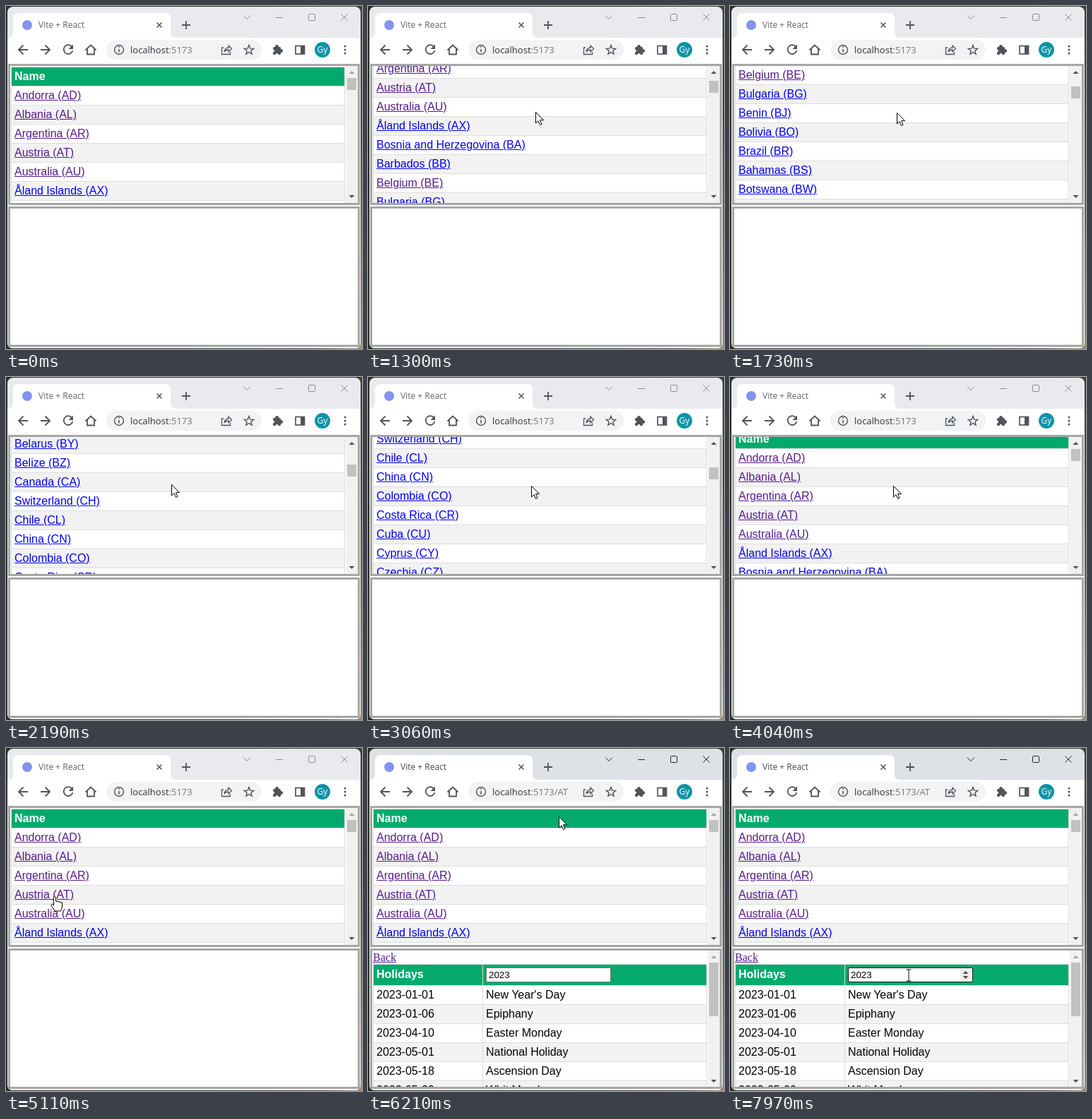
An HTML page for the animation above (8000 ms loop, 504 px wide and 486 px high).

```html
<!DOCTYPE html>
<html lang="en">
<head>
<meta charset="utf-8">
<title>Country holidays</title>
<style>
  html, body { margin: 0; width: 504px; height: 486px; overflow: hidden; }
  body { position: relative; background: linear-gradient(100deg, #2a3028 60%, #45433b 90%, #a08c78); }
  svg { position: absolute; left: 0; top: 0; overflow: visible; }
  .ui { font: 12px "Open Sans", "Noto Sans", sans-serif; }
  .panel { position: absolute; left: 3px; width: 492px; height: 194px; border: 3px solid #a6a6a6; background: #fff; overflow: hidden; }
  #top { top: 82px; }
  #bottom { top: 284px; height: 193px; }
  .page { position: absolute; left: 1px; top: 1px; width: 473px; font: 16px/18px "Liberation Sans", Arial, sans-serif; color: #000; }
  .row { box-sizing: border-box; position: relative; height: 27px; padding: 4px; border: 1px solid #ddd; border-bottom: 0; white-space: nowrap; background: #fff; }
  .row.odd { background: #f2f2f2; }
  .row.head { background: #04aa6d; color: #fff; font-weight: bold; }
  .row.tall { height: 30px; padding-top: 5px; }
  .col { position: absolute; left: 154px; top: 0; bottom: 0; border-left: 1px solid #ddd; padding: inherit; }
  .link { color: #00e; text-decoration: underline; }
  .seen { color: #551a8b; }
  .back { font-family: "Liberation Serif", "Times New Roman", serif; height: 18px; }
  .bar { position: absolute; right: 0; top: 0; width: 17px; height: 100%; background: #f1f1f1; }
  .thumb { position: absolute; left: 2px; top: 17px; width: 13px; background: #c1c1c1; }
  .input { box-sizing: border-box; position: absolute; left: 4px; top: 4px; width: 177px; height: 21px; padding-left: 3px; border: 1px solid #767676; background: #fff; color: #000; font: 13.333px/19px "Liberation Sans", Arial, sans-serif; }
  .input.focus { border-color: #101010; border-radius: 2px; }
  #spin { left: 158px; top: 2px; }
  #status { box-sizing: border-box; position: absolute; left: 2px; top: 462px; width: 168px; height: 22px; padding-left: 6px; line-height: 20px; color: #5f6368; background: #f1f3f4; border: 1px solid #c8cacc; border-left: 0; border-radius: 0 4px 0 0; }
</style>
</head>
<body>
<svg width="504" height="486" fill="none" stroke="#505458" stroke-width="1.8">
  <rect id="frame" x="2" y="1" width="500" height="484" rx="8" stroke="none"/>
  <path fill="#fff" stroke="none" d="M2 45Q10 45 10 37V18Q10 10 18 10H225Q233 10 233 18V37Q233 45 241 45H502V477Q502 485 494 485H10Q2 485 2 477Z"/>
  <circle cx="30" cy="27" r="7" fill="#8493ee" stroke="none"/>
  <text id="title" class="ui" x="46" y="31" stroke="none">Vite + React</text>
  <path stroke-width="1.5" d="M213.500 23.500l7 7m0-7l-7 7"/>
  <path d="M249 27h12m-6-6v12"/>
  <g id="buttons" stroke-width="1">
    <path d="M336 13.500l5 5 5-5M382 16.500h10M474.500 11.500l9 9m0-9l-9 9"/>
    <rect x="428.500" y="11.500" width="9" height="9" rx="1"/>
  </g>
  <path id="back" d="M31 62H18m6.500-6.500L18 62l6.500 6.500"/>
  <use href="#back" transform="translate(80) scale(-1 1)"/>
  <path d="M93.500 58A6.400 6.400 0 1 0 94.400 63"/>
  <path fill="#505458" stroke="none" d="M95 54.500v6.500h-6.500z"/>
  <path d="M112.500 62.500l7.500-7 7.500 7M115 61v7.500h10V61"/>
  <rect x="142" y="48" width="220" height="28" rx="14" fill="#f1f3f4" stroke="none"/>
  <circle cx="160" cy="62" r="6.500" stroke-width="1.400"/>
  <path stroke-width="1.600" d="M160 61v4.500m0-8.500v1.700"/>
  <text class="ui" x="176" y="66.500" style="font-size:13px" fill="#303337" stroke="none">localhost<tspan id="url" fill="#74787c"></tspan></text>
  <path stroke-width="1.300" d="M308 59h-2.500v9.500h12V65M309 65q1-6 6-6v-3l4.500 4.500L315 65v-3q-4 0-6 3z"/>
  <path id="star" stroke-width="1.400"/>
  <g fill="#505458" stroke="none">
    <rect x="378" y="58" width="11" height="11" rx="1.500"/>
    <circle cx="383.500" cy="57.500" r="2.500"/>
    <circle cx="389.500" cy="63.500" r="2.500"/>
  </g>
  <g fill="#fff" stroke="none">
    <circle cx="378" cy="63.500" r="2"/>
    <circle cx="383.500" cy="69" r="2"/>
  </g>
  <rect x="410" y="56.500" width="12.500" height="11.500" stroke-width="1.700"/>
  <path fill="#505458" stroke="none" d="M417 56h6v12h-6z"/>
  <circle cx="448" cy="62" r="11" fill="#0a94a6" stroke="none"/>
  <text class="ui" x="448" y="66" text-anchor="middle" fill="#fff" stroke="none">Gy</text>
  <path stroke-width="3" stroke-linecap="round" stroke-dasharray="0 5" d="M480 57v10.100"/>
</svg>

<div class="panel" id="top">
  <div class="page" id="countries"></div>
</div>
<div class="panel" id="bottom">
  <div id="detail">
    <div class="page">
      <div class="back"><span class="link seen">Back</span></div>
      <div class="row head tall">Holidays
        <div class="col"><div class="input" id="year">2023
          <svg id="spin" width="16" height="15"><path fill="#efefef" d="M0 0h15v15H0z"/><path fill="#505050" d="M3.500 6l4-4 4 4zm0 3l4 4 4-4z"/></svg>
        </div></div>
      </div>
      <div id="days"></div>
    </div>
  </div>
</div>
<div id="status" class="ui">localhost:5173/AT</div>

<svg id="cursor" width="20" height="24" fill="#fff" stroke="#000" stroke-linejoin="round">
  <path id="arrow" d="M.5.5V16L4 12.700 6.500 18.500 9 17.500 6.500 11.700H11.500Z"/>
  <path id="hand" d="M-1.500 13V1.500Q0-1 1.500 1.500V7L10.500 9V15L8.500 21H0L-5 13Q-4 9-1.500 13Z"/>
  <path id="beam" d="M-3.500-8h7M0-8V8M-3.500 8h7"/>
</svg>

<script>
const LOOP = 8000;
const $ = id => document.getElementById(id);
const show = (id, on) => { $(id).style.display = on ? "" : "none"; };

const countries = `Andorra AD,Albania AL,Argentina AR,Austria AT,Australia AU,Åland Islands AX,
Bosnia and Herzegovina BA,Barbados BB,Belgium BE,Bulgaria BG,Benin BJ,Bolivia BO,Brazil BR,
Bahamas BS,Botswana BW,Belarus BY,Belize BZ,Canada CA,Switzerland CH,Chile CL,China CN,
Colombia CO,Costa Rica CR,Cuba CU,Cyprus CY,Czechia CZ,Germany DE,Denmark DK`.split(/,\s*/);
const visited = ["AD", "AL", "AR", "AT", "AU", "BE"];
const holidays = [
  ["01-01", "New Year's Day"], ["01-06", "Epiphany"], ["04-10", "Easter Monday"],
  ["05-01", "National Holiday"], ["05-18", "Ascension Day"], ["05-29", "Whit Monday"],
];

const row = (html, i) => `<div class="row ${i % 2 ? "odd" : ""}">${html}</div>`;
$("countries").innerHTML = '<div class="row head">Name</div>' + countries.map((c, i) => {
  const name = c.slice(0, -3), code = c.slice(-2);
  return row(`<span class="link ${visited.includes(code) ? "seen" : ""}">${name} (${code})</span>`, i);
}).join("");
$("days").innerHTML = holidays.map(([d, name], i) => row(`2023-${d}<div class="col">${name}</div>`, i)).join("");

function addBar(parent, thumbHeight) {
  const bar = document.createElement("div");
  bar.className = "bar";
  bar.innerHTML = `<svg width="17" height="194"><path fill="#a3a3a3" d="M4.500 11l4-4 4 4z"/><path fill="#505050" d="M4.500 183l4 4 4-4z"/></svg>
    <div class="thumb" style="height:${thumbHeight}px"></div>`;
  parent.append(bar);
  return bar;
}
const bar = addBar($("top"), 17);
addBar($("detail"), 76);

const tips = Array.from({ length: 10 }, (_, i) => {
  const r = i % 2 ? 3 : 7, a = (i / 5 - 0.5) * Math.PI;
  return [344 + r * Math.cos(a), 62.5 + r * Math.sin(a)].map(v => v.toFixed(1)).join(" ");
});
$("star").setAttribute("d", "M" + tips.join("L") + "Z");

// at, until, steps, first value, last value, optional control point
const scrolls = [
  { at: 0, until: 1, steps: 1, a: [0], b: [0] },
  { at: 1200, until: 1970, steps: 7, a: [41], b: [398] },
  { at: 2190, until: 2500, steps: 3, a: [437], b: [560] },
  { at: 3060, until: 3830, steps: 7, a: [525], b: [161] },
  { at: 3930, until: 4140, steps: 2, a: [86], b: [-62] },
];
const moves = [
  { at: 320, until: 1080, steps: 7, a: [415, 435], b: [240, 150], via: [290, 210] },
  { at: 1200, until: 1970, steps: 7, a: [237, 150], b: [235, 152] },
  { at: 2190, until: 2500, steps: 3, a: [234, 152], b: [231, 154] },
  { at: 4480, until: 5110, steps: 6, a: [222, 158], b: [69, 210] },
  { at: 6140, until: 6210, steps: 1, a: [185, 150], b: [270, 97] },
  { at: 6210, until: 6860, steps: 6, a: [270, 97], b: [340, 50], via: [285, 10] },
  { at: 6980, until: 7750, steps: 7, a: [326, 62], b: [253, 322], via: [20, 260] },
];

// Value on a quadratic curve, advanced in even steps and held between segments
function sample(track, t) {
  const seg = track.filter(s => t >= s.at).pop();
  if (!seg) return null;
  const { at, until, steps, a, b, via } = seg;
  const p = Math.min(1, Math.floor((t - at) / (until - at) * steps + 0.15) / steps);
  return a.map((v, k) => {
    const mid = via ? via[k] : (v + b[k]) / 2;
    return Math.round((1 - p) ** 2 * v + 2 * p * (1 - p) * mid + p * p * b[k]);
  });
}

const within = (p, x1, y1, x2, y2) => p && p[0] >= x1 && p[0] <= x2 && p[1] >= y1 && p[1] <= y2;

function draw(t) {
  const active = t >= 5330;
  $("frame").setAttribute("fill", active ? "#dee1e6" : "#e8eaed");
  $("title").setAttribute("fill", active ? "#45494d" : "#5f6368");
  $("buttons").setAttribute("stroke", active ? "#222" : "#8a8c8f");
  $("url").textContent = t >= 5442 ? ":5173/AT" : ":5173";
  show("detail", t >= 5553);
  show("status", t >= 5442 && t < 6140);

  const y = Math.max(0, sample(scrolls, t)[0]);
  $("countries").style.top = 1 - y + "px";
  bar.querySelector(".thumb").style.top = 17 + Math.floor(y * 0.051) + "px";
  bar.querySelector("path").setAttribute("fill", y ? "#505050" : "#a3a3a3");

  const pos = sample(moves, t);
  const inField = within(pos, 167, 311, 326, 332);
  const overUrl = within(pos, 172, 50, 300, 74);
  const overLink = within(pos, 12, 199, 97, 216);
  const kind = inField || overUrl ? "beam" : overLink ? "hand" : "arrow";
  show("cursor", pos);
  for (const k of ["arrow", "hand", "beam"]) show(k, k === kind);
  if (pos) $("cursor").style.transform = `translate(${pos[0]}px, ${pos[1]}px)`;
  show("spin", inField);
  $("year").classList.toggle("focus", t >= 7850);
}

function tick() {
  draw(performance.now() % LOOP);
  requestAnimationFrame(tick);
}
tick();
</script>
</body>
</html>
```
